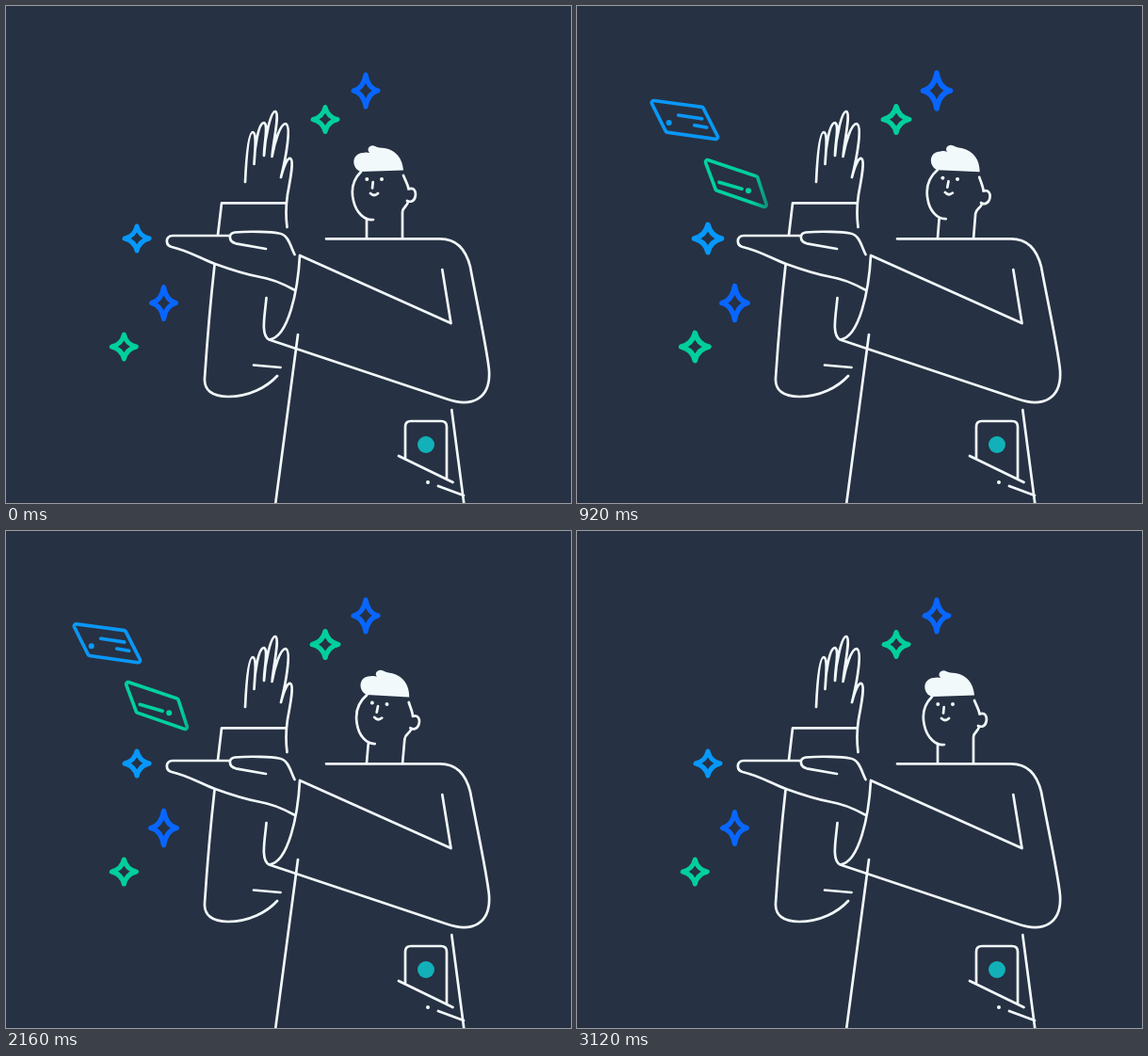
These frames come from a looping animation (600 by 528 pixels, 3640 ms). An HTML page with a canvas:

```html
<!DOCTYPE html>
<html lang="en">
<head>
<meta charset="utf-8">
<title>Cards</title>
<style>
  html, body { margin: 0; width: 100%; height: 100%; overflow: hidden; background: #263143; }
  canvas { display: block; width: 600px; height: 528px; }
</style>
</head>
<body>
<canvas id="stage" width="600" height="528"></canvas>
<script>
const W = 600, H = 528, LOOP = 3640, STEP = 40;
const INK = '#f2f9fb', BLUE = '#0866ff', SKY = '#0698fb', GREEN = '#00cf9c', TEAL = '#12b0b8';
const ctx = document.getElementById('stage').getContext('2d');
const layer = document.createElement('canvas');
layer.width = W;
layer.height = H;
const lc = layer.getContext('2d');

const body = new Path2D([
  // raised hand
  'M254 187C255 165 257 134 262 134C267 135 264 155 263.5 168C264 150 268 124 274 124C279 126 274 145 274 159',
  'M274 159C275 140 281 112 286 112C291 114 284 142 282.5 160C285 146 291 125 297 125C303 127 298 158 292 182',
  'C295 170 299 161 302 162C306 164 302 184 299 200C297 213 297 224 298.5 235',
  // raised sleeve
  'M225 243L229 209.3H298',
  'M221.5 275C217 315 213 365 211 395C210 408 219 415 236 415C258 415 277 405 288 393',
  'M263 381.5L291.5 384',
  // flat hand
  'M238 244H177C169 244.500 169 254 176 256C194 260 208 269 222 274C240 280.500 254 285 268 287.500C284 290 296 296 306 301.500',
  'M276 258L244 252.300C236 250 236 241.500 243 240.500C260 239 282 240 290 241.500C300 243 302 255 306.500 264',
  // near arm
  'M312 265C310 302 300 352 279.500 354.500C270 350 275 328 276.500 310',
  'M312 265L472.500 337L463.300 280',
  'M279.500 354.500L468 417.500C495 427 515 417 513 387C511 365 499 310 493 277C488 257 477 247.300 461 247.300H340',
  // torso and pocket
  'M310 349L286 530M473.300 429L486.500 530',
  'M424 480V447Q424 441 430 441H462Q468 441 468 447V502',
  'M417 478L474.500 506M459 510L486 520'
].join(''));

const hair = new Path2D('M377 176C367 173 366 157 379 156C382 155 384 155.500 386 156C382 152 387 146.500 392 149C395 150.500 398 150.500 402 151C414 153 421 162 422 174.500Z');
const head = new Path2D([
  'M377 176C369 184 366 195 369 207C372 220 381 228 390 227',
  'M383 227V250',
  'M422 180C424 185 427 190 427.500 194.500C433 192 436 197 434.500 203C433 208 429 208.500 426 207',
  'M427 208C426 213 421 214 421 219V250',
  'M389.700 187L389 193.500',
  'M387 199Q391 203 395 199'
].join(''));

const starPath = tall => new Path2D(
  `M0 ${-tall}Q2.5 -2.5 13 0Q2.5 2.5 0 ${tall}Q-2.5 2.5 -13 0Q-2.5 -2.5 0 ${-tall}Z`);

// x, y, half height, colour, pulse start, pulse end
const stars = [
  [382, 90, 17, BLUE, 0, 2280],
  [339, 120.5, 13, GREEN, 320, 2760],
  [139, 247, 13, SKY, 0, 2280],
  [167.5, 315.5, 17, BLUE, 320, 2760],
  [125.3, 362, 13, GREEN, 0, 2280]
].map(([x, y, tall, color, from, to]) => ({ x, y, color, from, to, path: starPath(tall) }));

const cards = [
  {
    color: SKY, corners: [71, 99, 127, 106.5, 144.5, 141, 88, 133],
    lines: 'M101 115L126 118.800M118 125.700L131 128', dot: [91, 123],
    rest: 0.5, inDist: 28, inRate: 0.0054, inSlope: 0.24,
    outDist: 6, outRate: 0.0071, outSlope: 0.25
  },
  {
    color: GREEN, corners: [131, 161, 187.5, 180, 198.5, 213.5, 143.5, 194.5],
    lines: 'M147 186L171 193', dot: [178, 195],
    rest: -0.5, inDist: 20.5, inRate: 0.0054, inSlope: 0.38,
    outDist: 19.5, outRate: 0.00536, outSlope: 0.28
  }
];

for (const c of cards) {
  const p = c.corners;
  c.path = new Path2D();
  c.path.moveTo((p[0] + p[2]) / 2, (p[1] + p[3]) / 2);
  for (let i = 2; i <= 8; i += 2) {
    const a = i % 8, b = (i + 2) % 8;
    c.path.arcTo(p[a], p[a + 1], p[b], p[b + 1], 2.2);
  }
  c.path.closePath();
  c.path.addPath(new Path2D(c.lines));
}

const clamp = v => Math.max(0, Math.min(1, v));
const ease = v => (1 - Math.cos(Math.PI * clamp(v))) / 2;

function dot(c, x, y, r, color) {
  c.fillStyle = color;
  c.beginPath();
  c.arc(x, y, r, 0, Math.PI * 2);
  c.fill();
}

function drawCards(t) {
  const N = 8, SHUTTER = 14;
  lc.clearRect(0, 0, W, H);
  lc.globalCompositeOperation = 'lighter';
  lc.globalAlpha = 1 / N;
  lc.lineWidth = 3.6;
  lc.lineCap = lc.lineJoin = 'round';
  for (const c of cards) {
    lc.strokeStyle = c.color;
    for (let i = 0; i < N; i++) {
      const s = t + ((i + 0.5) / N - 0.5) * SHUTTER;
      const enter = c.inDist * Math.exp(-c.inRate * (s - 640));
      const leave = c.outDist * Math.exp(c.outRate * (s - 2440));
      lc.save();
      lc.translate(c.rest + enter - leave, enter * c.inSlope - leave * c.outSlope - 0.5);
      lc.stroke(c.path);
      dot(lc, c.dot[0], c.dot[1], 3, c.color);
      lc.restore();
    }
  }
  // cards fade in as they leave the hand
  const fade = lc.createLinearGradient(186, 0, 226, 0);
  fade.addColorStop(0, '#000f');
  fade.addColorStop(1, '#0000');
  lc.globalAlpha = 1;
  lc.globalCompositeOperation = 'destination-in';
  lc.fillStyle = fade;
  lc.fillRect(0, 0, W, H);
  ctx.drawImage(layer, 0, 0);
}

function drawStar(s, t) {
  const wave = Math.sin(Math.PI * clamp((t - s.from) / (s.to - s.from)));
  const k = 1 + 0.13 * wave * wave;
  ctx.save();
  ctx.translate(s.x, s.y);
  ctx.scale(k, k);
  ctx.lineWidth = 5;
  ctx.strokeStyle = s.color;
  ctx.stroke(s.path);
  ctx.restore();
}

function drawHead(t) {
  const tilt = 5 * (ease(t / 1140) - ease((t - 2500) / 620));
  ctx.save();
  ctx.beginPath();
  ctx.rect(0, 0, W, 247);
  ctx.clip();
  ctx.translate(402, 247);
  ctx.rotate(tilt * Math.PI / 180);
  ctx.translate(-402, -247);
  ctx.stroke(head);
  ctx.fillStyle = INK;
  ctx.fill(hair);
  dot(ctx, 383.3, 184, 2, INK);
  dot(ctx, 399, 184, 2, INK);
  ctx.restore();
}

function draw(t) {
  ctx.fillStyle = '#263143';
  ctx.fillRect(0, 0, W, H);
  ctx.lineCap = ctx.lineJoin = 'round';
  drawCards(t);
  for (const s of stars) drawStar(s, t);
  ctx.lineWidth = 2.7;
  ctx.strokeStyle = INK;
  ctx.stroke(body);
  drawHead(t);
  dot(ctx, 448, 506, 2, INK);
  dot(ctx, 446, 466, 9, TEAL);
}

const start = performance.now();
function tick() {
  const t = (performance.now() - start) % LOOP;
  draw(Math.floor(t / STEP) * STEP);
  requestAnimationFrame(tick);
}
tick();
</script>
</body>
</html>
```
